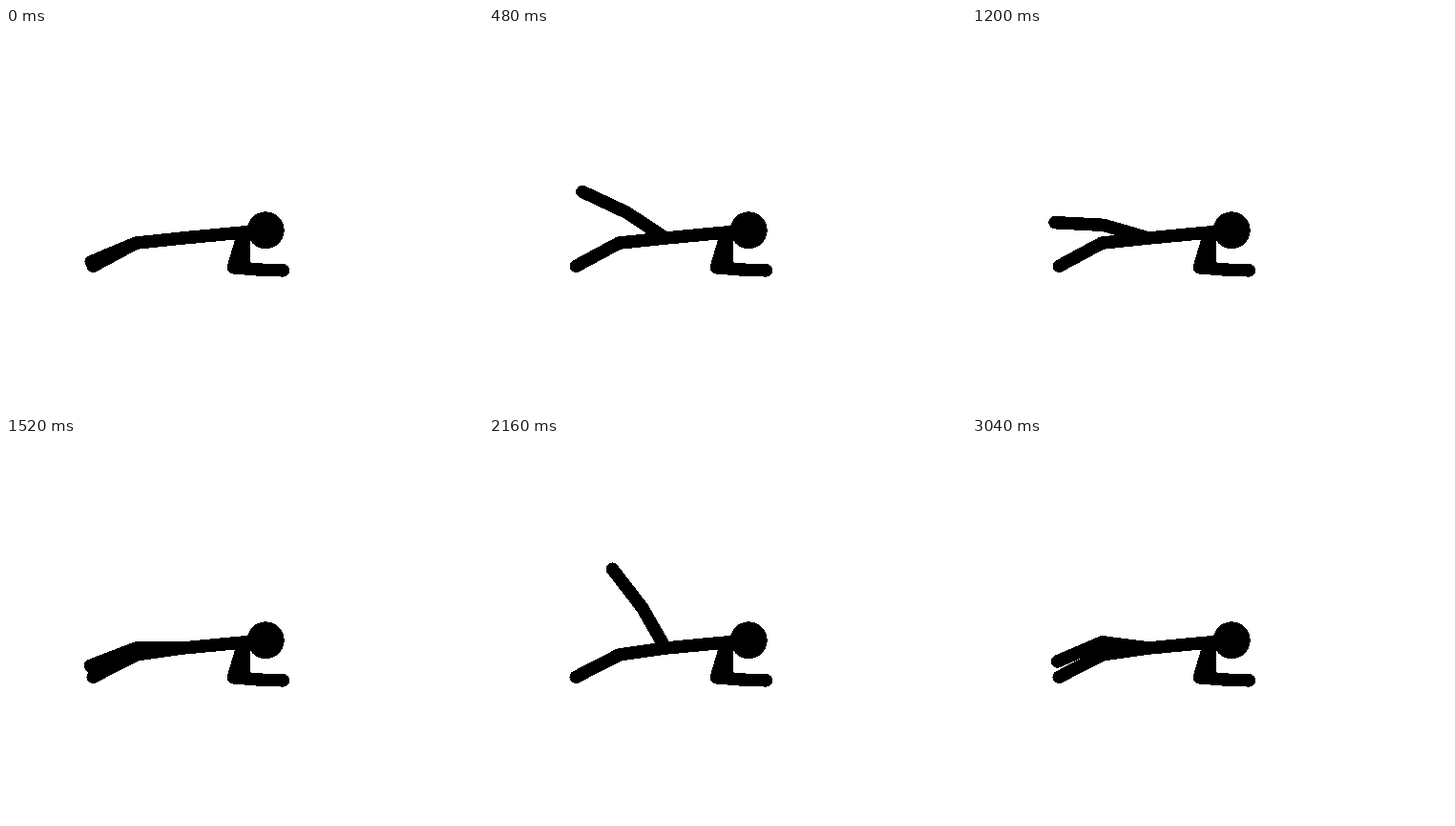
Animation, 500 px wide and 400 px high, one loop 3.12 s. Source, as an HTML page:

```html
<!DOCTYPE html>
<html lang="en">
<head>
<meta charset="utf-8">
<title>Plank leg lifts</title>
<style>
  html, body { margin: 0; width: 100%; height: 100%; overflow: hidden; background: #fff; }
  svg { display: block; }
  path { fill: none; stroke: #000; stroke-width: 13.5; stroke-linecap: round; stroke-linejoin: round; }
</style>
</head>
<body>
<svg width="500" height="400" shape-rendering="crispEdges">
  <path d="M185 220L254 213.5"/>
  <path d="M248.5 217L238.3 250.8L272 253.5L290.5 253.8"/>
  <path d="M249 214L249.8 251"/>
  <circle cx="272.2" cy="211.8" r="19.5"/>
  <path id="first"/>
  <path id="second"/>
</svg>
<script>
const STEP = 80, STEPS = 39;
const HIP = [185, 220], THIGH = 49, SHIN = 51;

// Angles are degrees above horizontal; each move eases toward its own pose.
const legs = {
  first: {
    rest: { thigh: -6, shin: -22.7 },
    moves: [
      { from: 0, to: 9, thigh: 62, shin: 60, power: 1.35 },
      { from: 9, to: 18, thigh: -8.2, shin: -27.2, power: 1.05 }
    ]
  },
  second: {
    rest: { thigh: -6, shin: -28.3 },
    moves: [
      { from: 18, to: 27, thigh: 60, shin: 52.3, power: 1.1 },
      { from: 27, to: 29, thigh: 69, shin: 60, power: 1 },
      { from: 29, to: 38, thigh: 7.3, shin: -23.3, power: 1 }
    ]
  }
};

function angle({ rest, moves }, part, step) {
  return moves.reduce((value, move) => {
    const p = Math.min(1, Math.max(0, (step - move.from) / (move.to - move.from)));
    return value + (move[part] - value) * p ** move.power;
  }, rest[part]);
}

function extend([x, y], length, degrees) {
  const r = degrees * Math.PI / 180;
  return [x - length * Math.cos(r), y - length * Math.sin(r)];
}

const start = performance.now();

function draw() {
  const step = Math.floor((performance.now() - start) / STEP) % STEPS;
  for (const id in legs) {
    const knee = extend(HIP, THIGH, angle(legs[id], "thigh", step));
    const foot = extend(knee, SHIN, angle(legs[id], "shin", step));
    document.getElementById(id).setAttribute("d", `M${HIP}L${knee}L${foot}`);
  }
  requestAnimationFrame(draw);
}
draw();
</script>
</body>
</html>
```
